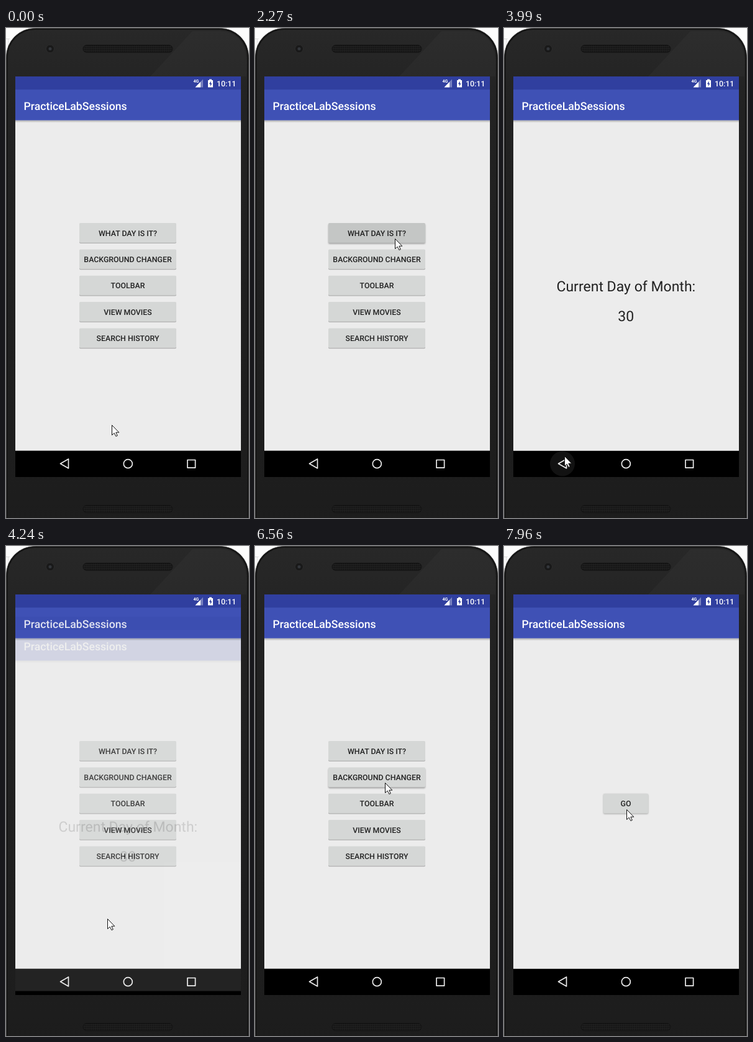
Recreate the animation shown at these times as an HTML page. Size 391 by 789 pixels, loop 8000 ms.

```html
<!DOCTYPE html>
<html lang="en">
<head>
<meta charset="utf-8">
<title>Phone demo</title>
<style>
  html, body { margin: 0; width: 100%; height: 100%; overflow: hidden; background: #fcfcfc; }
  svg { display: block; font-family: Roboto, sans-serif; text-rendering: geometricPrecision; }
  .title { font-size: 17.66px; font-weight: 500; fill: #fff; }
  .label { font-size: 12.36px; font-weight: 500; fill: #212121; text-anchor: middle; }
  .big { font-size: 23px; fill: #212121; text-anchor: middle; }
  .face { fill: #d5d7d6; }
</style>
</head>
<body>
<svg width="391" height="789" viewBox="0 0 391 789">
  <defs>
    <linearGradient id="body" x1="0" y1="0" x2="0" y2="1">
      <stop offset="0" stop-color="#282828"/>
      <stop offset=".15" stop-color="#222"/>
      <stop offset="1" stop-color="#1c1c1c"/>
    </linearGradient>
    <linearGradient id="drop" x1="0" y1="0" x2="0" y2="1">
      <stop offset="0" stop-opacity=".27"/>
      <stop offset="1" stop-opacity="0"/>
    </linearGradient>
    <pattern id="mesh" width="3" height="3" patternUnits="userSpaceOnUse">
      <rect width="3" height="3" fill="#222"/>
      <circle cx="1.5" cy="1.5" r="1.1" fill="#0e0e0e"/>
    </pattern>
    <clipPath id="screen"><rect x="15" y="78" width="363" height="645"/></clipPath>
  </defs>

  <path d="M0 17.5H6M3.5 18V30" stroke="#ddd" fill="none"/>
  <rect x=".5" y=".5" width="390" height="880" rx="46" fill="url(#body)" stroke="#484848"/>
  <rect x="2" y="2" width="387" height="877" rx="44.500" fill="none" stroke="#141414" stroke-width="2"/>
  <path d="M300 5H345Q384 8 387 50V78H232Z" fill="#fff" opacity=".025"/>
  <g fill="url(#mesh)" stroke="#131313">
    <rect x="124" y="27.5" width="144" height="12" rx="6"/>
    <rect x="124" y="768.5" width="144" height="12" rx="6"/>
  </g>
  <circle cx="71" cy="33.500" r="6.500" fill="#191919" stroke="#2c2c2c"/>
  <circle cx="71" cy="33.500" r="2.500" fill="#33363b"/>

  <g clip-path="url(#screen)">
    <rect x="15" y="78" width="363" height="645"/>
    <g id="menu"></g>
    <g id="day"></g>
    <g id="go"></g>

    <g fill="#fff">
      <text x="301.500" y="88" font-size="7" font-weight="700">4G</text>
      <path d="M304.500 95.500H317V82.500Z" opacity=".35"/>
      <path d="M304.500 95.500H313V86.700Z"/>
      <path d="M327 82.500H331V84H333V95.500H325V84H327Z"/>
      <path d="M329.800 85.500L326.800 90.300H328.700V94L331.500 89.200H329.800Z" fill="#303f9f"/>
      <text x="339" y="93.500" font-size="12.360" font-weight="500">10:11</text>
    </g>

    <circle id="backGlow" cx="94" cy="701.500" fill="#fff"/>
    <g fill="none" stroke="#ededed" stroke-width="1.700" stroke-linejoin="round">
      <path d="M87.500 701.500L100.500 694V709Z"/>
      <circle cx="196.300" cy="701.700" r="7"/>
      <rect x="292" y="695.500" width="12.600" height="12.600"/>
    </g>
  </g>
  <path id="cursor" d="M.5 .5V16.500L4.200 13.200L6.900 18.500L9.300 17.400L6.800 12.200H11.800Z" fill="#fff" stroke="#111"/>
</svg>

<script>
const LOOP = 8000;
const OPEN_DAY = 2310, CLOSE_DAY = 4013, OPEN_GO = 7020;

// Layout in density-independent pixels, scaled to the stage
const DP = 363 / 411.43, TOP = 78;
const STATUS = 24 * DP, BAR_END = TOP + 80 * DP, NAV = 723 - 48 * DP;
const ROW = 48 * DP, FACE = 36 * DP, MIDDLE = (BAR_END + NAV) / 2;
const SLIDE = 51.6;

const $ = id => document.getElementById(id);
const clamp = v => Math.min(1, Math.max(0, v));
const progress = (t, start, length) => clamp((t - start) / length);
const decel = (p, power) => 1 - (1 - p) ** power;

function button(id, label, center, w) {
  const face = `x="${196 - w / 2}" y="${center - FACE / 2}" width="${w}" height="${FACE}" rx="1.8"`;
  return `
  <clipPath id="${id}Clip"><rect ${face}/></clipPath>
  <rect id="${id}" class="face" ${face}/>
  <circle id="${id}Ripple" clip-path="url(#${id}Clip)" opacity=".08"/>
  <text class="label" x="196" y="${center + 4.7}">${label}</text>`;
}

const page = content => `
  <rect x="15" y="${TOP}" width="363" height="${NAV - TOP}" fill="#ececec"/>
  <rect x="15" y="${BAR_END}" width="363" height="4" fill="url(#drop)"/>
  <rect x="15" y="${TOP}" width="363" height="${BAR_END - TOP}" fill="#3f51b5"/>
  <rect x="15" y="${TOP}" width="363" height="${STATUS}" fill="#303f9f"/>
  <text class="title" x="28.500" y="131.500">PracticeLabSessions</text>${content}`;

const labels = ["WHAT DAY IS IT?", "BACKGROUND CHANGER", "TOOLBAR", "VIEW MOVIES", "SEARCH HISTORY"];
$("menu").innerHTML = page(labels.map((s, i) => button("item" + i, s, MIDDLE + (i - 2) * ROW, 156)).join(""));
$("day").innerHTML = page(`
  <text class="big" x="196.300" y="423.700">Current Day of Month:</text>
  <text class="big" x="196.300" y="471.700">30</text>`);
$("go").innerHTML = page(button("goButton", "GO", MIDDLE, 72));

// Button id, press time, ripple start, release, touch point
const presses = [
  ["item0", 1860, 2010, 2300, 225, 339],
  ["item1", 6390, 6740, 7000, 209, 381],
  ["goButton", 7910, LOOP, LOOP, 197, 424]
];

// Pointer tip: time, x, y
const route = [
  [0, 170, 639], [40, 170, 639], [140, 174, 639], [290, 174, 639],
  [540, 339, 350], [680, 257, 279], [890, 257, 279], [1250, 232, 346],
  [1430, 225, 339], [2330, 225, 339], [2800, 132, 638], [2840, 132, 638],
  [2970, 118, 649], [3200, 97, 698], [3360, 89, 700], [3960, 89, 700],
  [4240, 163, 600], [4410, 182, 573], [4440, 182, 573], [4840, 232, 518],
  [5230, 232, 518], [5340, 163, 445], [5550, 163, 445], [5560, 162, 428],
  [5990, 209, 381], [6980, 209, 381], [7090, 200, 424], [7250, 197, 436],
  [7430, 197, 436], [7510, 197, 424], [LOOP, 197, 424]
];

function pointerAt(t) {
  const i = route.findIndex(k => k[0] > t);
  const [t0, x0, y0] = route[i - 1], [t1, x1, y1] = route[i];
  const p = (t - t0) / (t1 - t0);
  return [Math.round(x0 + (x1 - x0) * p), Math.round(y0 + (y1 - y0) * p)];
}

function place(id, offset, alpha) {
  const el = $(id);
  el.setAttribute("transform", `translate(0 ${Math.round(offset)})`);
  el.setAttribute("opacity", alpha);
  el.setAttribute("visibility", alpha > 0 ? "visible" : "hidden");
}

const openPage = (id, t, start) =>
  place(id, SLIDE * (1 - decel(progress(t, start, 350), 5)), decel(progress(t, start, 170), 3));

function closePage(id, t, start) {
  const p = progress(t, start, 250);
  place(id, SLIDE * p ** 4, 1 - clamp((p - .4) / .6));
}

function menuAlpha(t) {
  if (t >= OPEN_GO) return 1 - .3 * progress(t, OPEN_GO, 217);
  if (t >= CLOSE_DAY) return .7 + .3 * decel(progress(t, CLOSE_DAY, 250), 5);
  return 1 - .3 * progress(t, OPEN_DAY, 217);
}

function drawPress([id, down, ripple, release, x, y], t) {
  const lift = t < release ? progress(t, down, 150) : 0;
  $(id).style.filter = `drop-shadow(0 ${1 + lift}px ${.7 + lift * .6}px rgba(0,0,0,.3))`;
  const wave = $(id + "Ripple");
  wave.setAttribute("cx", x);
  wave.setAttribute("cy", y);
  wave.setAttribute("r", t < release ? 125 * decel(progress(t, ripple, 220), 2) : 0);
}

function draw(t) {
  place("menu", 0, menuAlpha(t));
  if (t < CLOSE_DAY) openPage("day", t, OPEN_DAY);
  else closePage("day", t, CLOSE_DAY);
  openPage("go", t, OPEN_GO);
  presses.forEach(p => drawPress(p, t));

  $("backGlow").setAttribute("r", t < 3610 ? 0 : 20 * decel(progress(t, 3610, 220), 2));
  $("backGlow").setAttribute("opacity", .2 * (1 - progress(t, 3830, 250)));
  $("cursor").setAttribute("transform", `translate(${pointerAt(t)})`);
}

document.querySelectorAll(".face").forEach(el => el.style.filter = "drop-shadow(0 1px .7px rgba(0,0,0,.3))");
const begin = performance.now();
function tick() {
  draw((performance.now() - begin) % LOOP);
  requestAnimationFrame(tick);
}
tick();
</script>
</body>
</html>
```
